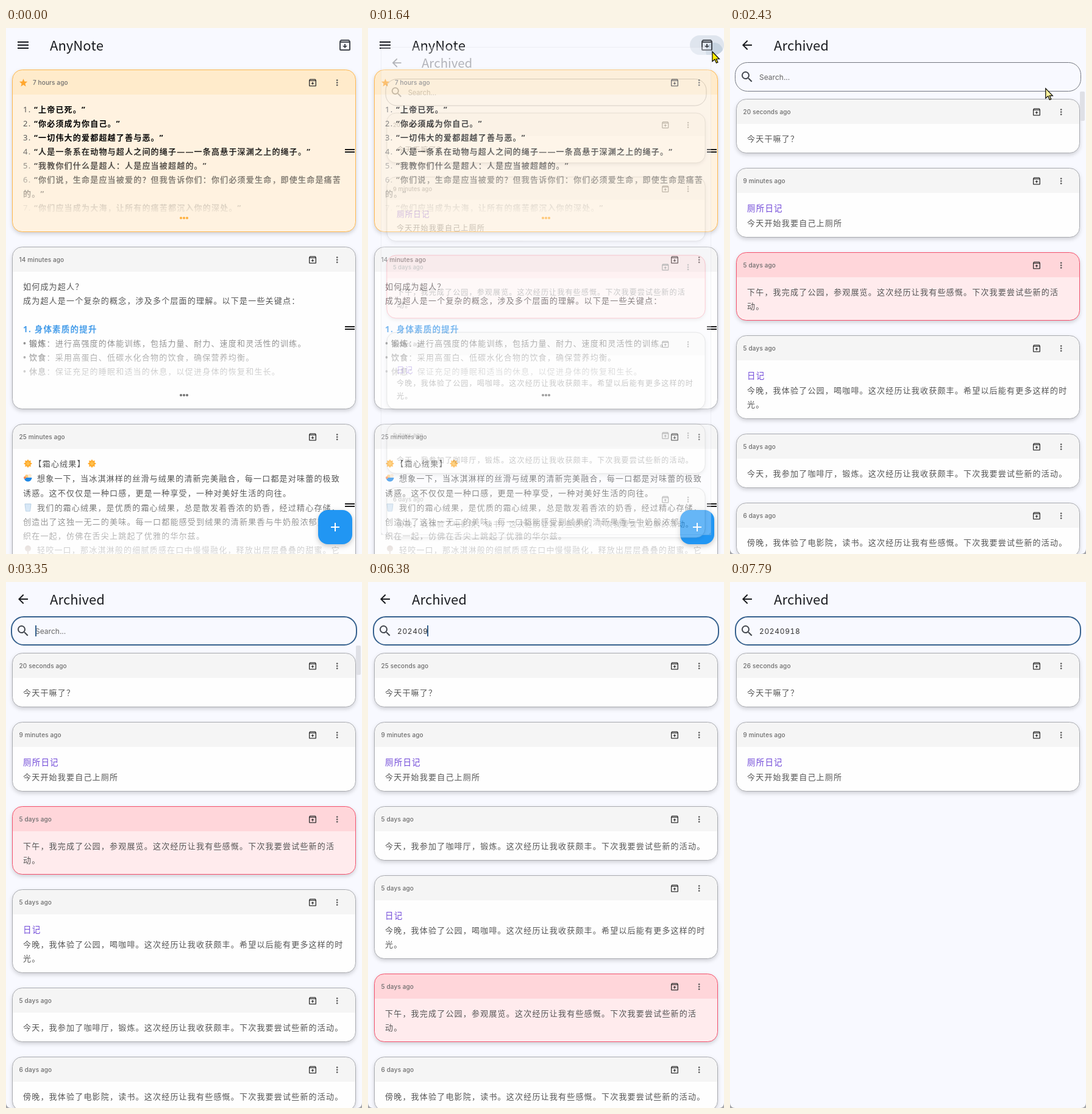
Animation, 584 px wide and 861 px high, one loop 8000 ms. Source, as an HTML page:

```html
<!DOCTYPE html>
<html lang="zh-CN">
<head>
<meta charset="utf-8">
<title>Notes</title>
<style>
html,body{margin:0;width:100%;height:100%;overflow:hidden;background:#f8f9ff}
svg{display:block;position:absolute;left:0;top:0}
text{font-family:"Noto Sans CJK SC",sans-serif;white-space:pre;text-spacing-trim:space-all;font-kerning:none}
.title{font-size:22px;fill:#1a1c20}
.time,.hint,.query{font-family:Inter,sans-serif}
.time{font-size:10px;font-weight:500;letter-spacing:.12px;fill:#6c6c6c}
.body{font-family:"Noto Sans","Noto Sans CJK SC",sans-serif;font-size:13px;letter-spacing:1.2px;fill:#555}
.bold{font-weight:700}
.dark{fill:#000}
.head{font-size:13.5px;fill:#7048d8}
.blue{font-size:13.5px;font-weight:700;fill:#1e88e5}
.hint{font-size:12px;fill:#666}
.query{font-size:12px;font-variant-numeric:tabular-nums;letter-spacing:.65px;fill:#333}
.card{filter:drop-shadow(0 3px 3px rgba(0,0,0,.16))}
.fab{filter:drop-shadow(0 3px 4px rgba(0,0,0,.22))}
</style>
</head>
<body>
<svg id="stage" width="584" height="861" viewBox="0 0 584 861"></svg>
<script>
const ICON = {
  menu: 'M3 18h18v-2H3zM3 13h18v-2H3zM3 6v2h18V6z',
  back: 'M20 11H7.83l5.59-5.59L12 4l-8 8 8 8 1.41-1.41L7.83 13H20z',
  search: 'M15.5 14h-.79l-.28-.27A6.47 6.47 0 0 0 16 9.5 6.5 6.5 0 1 0 9.5 16c1.61 0 3.09-.59 4.23-1.57l.27.28v.79l5 4.99L20.49 19zm-6 0C7.01 14 5 11.99 5 9.5S7.01 5 9.5 5 14 7.01 14 9.5 11.99 14 9.5 14z',
  box: 'M20.54 5.23l-1.39-1.68C18.88 3.21 18.47 3 18 3H6c-.47 0-.88.21-1.16.55L3.46 5.23C3.17 5.57 3 6.02 3 6.5V19c0 1.1.9 2 2 2h14c1.1 0 2-.9 2-2V6.5c0-.48-.17-.93-.46-1.27zM6.24 5h11.52l.83 1H5.42zM5 19V8h14v11z',
  down: 'M13 10h-2v3H8l4 4 4-4h-3z',
  up: 'M8 14h3v3h2v-3h3l-4-4z'
};
const THEME = {
  plain: {line: '#a9abb0', top: '#f5f5f5', fill: '#fefefe', dots: '#757575'},
  gold: {line: '#ffb74d', top: '#ffebcb', fill: '#fff2e0', dots: '#ffb140'},
  rose: {line: '#f4506c', top: '#ffd6da', fill: '#ffebed', dots: '#757575'}
};

const text = (x, y, cls, s) => `<text x="${x}" y="${y}" class="${cls}">${s}</text>`;
const body = (x, mid, s, cls = '') => text(x, mid + 5, 'body ' + cls, s);
const rect = (x, y, w, h, r, fill, more = '') =>
  `<rect x="${x}" y="${y}" width="${w}" height="${h}" rx="${r}" fill="${fill}" ${more}/>`;
const dot = (x, y, r, fill) => `<circle cx="${x}" cy="${y}" r="${r}" fill="${fill}"/>`;
const icon = (d, x, y, size, fill) =>
  `<path transform="translate(${x} ${y}) scale(${size / 24})" fill="${fill}" d="${d}"/>`;

function star(x, y, tips, outer, inner, fill) {
  const pts = Array.from({length: tips * 2}, (_, i) => {
    const a = i * Math.PI / tips - Math.PI / 2, r = i % 2 ? inner : outer;
    return (x + r * Math.cos(a)).toFixed(1) + ',' + (y + r * Math.sin(a)).toFixed(1);
  });
  return `<polygon points="${pts.join(' ')}" fill="${fill}"/>`;
}

function card({y, h, time, theme = 'plain', arrow = 'up', starred, inner = ''}) {
  const c = THEME[theme], mid = y + 21.5;
  return `<g class="card">${rect(10.5, y + .5, 563, h, 16, c.fill)}
    <path fill="${c.top}" d="M10.5 ${y + 41}v-24.5a16 16 0 0 1 16-16h531a16 16 0 0 1 16 16v24.5z"/>
    ${rect(10.5, y + .5, 563, h, 16, 'none', `stroke="${c.line}"`)}</g>
    ${starred ? star(28.5, y + 22, 5, 7, 3.1, '#ffa72f') : ''}
    ${text(starred ? 44 : 21.5, y + 25, 'time', time)}
    ${icon(ICON.box + ICON[arrow], 495, mid - 8, 16, '#333')}
    ${[-4, 0, 4].map(d => dot(543.2, mid + d, 1.35, '#555')).join('')}${inner}`;
}

// tall card whose text fades out towards the bottom
function tallCard(o) {
  const c = THEME[o.theme || 'plain'], id = 'fade' + o.y;
  const fade = `<linearGradient id="${id}" gradientUnits="userSpaceOnUse" x1="0" x2="0" y1="${o.y + 112}" y2="${o.y + 240}">
    <stop stop-color="${c.fill}" stop-opacity="0"/><stop offset="1" stop-color="${c.fill}"/></linearGradient>
    ${rect(12, o.y + 112, 560, 135, 0, `url(#${id})`)}`;
  const more = [287, 292, 297].map(x => dot(x, o.y + 243, 2.1, c.dots)).join('');
  const grip = rect(556, o.y + 130, 16, 2, 0, '#1a1a1a') + rect(556, o.y + 134, 16, 2, 0, '#1a1a1a');
  return card({...o, h: 265, arrow: 'down', inner: o.inner + fade + more + grip});
}

const quotes = [
  '“上帝已死。”', '“你必须成为你自己。”', '“一切伟大的爱都超越了善与恶。”',
  '“人是一条系在动物与超人之间的绳子——一条高悬于深渊之上的绳子。”',
  '“我教你们什么是超人：人是应当被超越的。”',
  '“你们说，生命是应当被爱的？但我告诉你们：你们必须爱生命，即使生命是痛苦',
  '“你们应当成为大海，让所有的痛苦都沉入你的深处。”'
];
const goldText = quotes.map((q, i) => {
  const y = 133 + 23 * (i + (i > 5));
  return body(28, y, i + 1 + '.') + body(46, y, q, 'bold dark');
}).join('') + body(28, 271, '的。”', 'bold dark');

const tips = [
  ['锻炼', '进行高强度的体能训练，包括力量、耐力、速度和灵活性的训练。'],
  ['饮食', '采用高蛋白、低碳水化合物的饮食，确保营养均衡。'],
  ['休息', '保证充足的睡眠和适当的休息，以促进身体的恢复和生长。']
];
const tipText = body(28, 423, '如何成为超人？')
  + body(28, 446, '成为超人是一个复杂的概念，涉及多个层面的理解。以下是一些关键点：')
  + body(28, 493, '1. 身体素质的提升', 'blue')
  + tips.map(([k, v], i) => {
    const y = 516 + 23 * i;
    return body(28, y, '•', 'bold') + body(38, y, k, 'bold') + body(66.4, y, '：') + body(80.8, y, v);
  }).join('');

const spark = x => star(x, 713, 8, 7, 4.6, '#ffa726') + star(x, 713, 5, 4.5, 2.2, '#ffc04d');
const bowl = dot(34, 734, 3, '#ffcc80') + dot(39, 733, 3, '#ffe9d2')
  + '<path fill="#1e88e5" d="M29.5 736h13a6.5 6.5 0 0 1-13 0z"/>' + dot(31, 736, 2, '#ff8a50');
const cup = '<path fill="#cfe3f5" stroke="#a9c6de" d="M31 779h10l-1.5 12h-7z"/>';
const fruitText = spark(36) + body(45.5, 713, '【霜心绒果】') + spark(141) + bowl
  + body(51, 737, '想象一下，当冰淇淋样的丝滑与绒果的清新完美融合，每一口都是对味蕾的极致')
  + body(28, 761, '诱惑。这不仅仅是一种口感，更是一种享受，一种对美好生活的向往。') + cup
  + body(51, 785, '我们的霜心绒果，是优质的霜心绒果，总是散发着香浓的奶香，经过精心存储，')
  + body(28, 808, '创造出了这独一无二的美味。每一口都能感受到绒果的清新果香与牛奶般浓郁交')
  + body(28, 831, '织在一起，仿佛在舌尖上跳起了优雅的华尔兹。')
  + dot(36, 852, 5, '#b9a59c') + rect(35, 856, 2, 5, 0, '#b9a59c')
  + body(51, 854, '轻咬一口，那冰淇淋般的细腻质感在口中慢慢融化，释放出层层叠叠的甜蜜。它');

const home = rect(0, 0, 584, 861, 0, '#f8f9ff')
  + icon(ICON.menu, 16, 16, 24, '#1a1c20') + text(72, 37, 'title', 'AnyNote')
  + `<g id="press">${rect(528, 12, 56, 32, 16, '#dfe5ee')}<circle id="ripple" cx="568" cy="38" fill="#c6d3e0" clip-path="url(#pill)"/></g>`
  + icon(ICON.box + ICON.down, 544, 16, 24, '#43474e')
  + tallCard({y: 68, theme: 'gold', starred: true, time: '7 hours ago', inner: goldText})
  + tallCard({y: 358, time: '14 minutes ago', inner: tipText})
  + tallCard({y: 648, time: '25 minutes ago', inner: fruitText})
  + `<g class="fab">${rect(512, 789, 56, 56, 16, '#2196f3')}</g>`
  + '<path d="M533 817h14M540 810v14" stroke="#fff" stroke-width="2"/>';

const NOTES = {
  today: {h: 88, lines: ['今天干嘛了？']},
  log: {h: 113, time: '9 minutes ago', head: '厕所日记', lines: ['今天开始我要自己上厕所']},
  park: {h: 111, time: '5 days ago', theme: 'rose', lines: ['下午，我完成了公园，参观展览。这次经历让我有些感慨。下次我要尝试些新的活', '动。']},
  diary: {h: 136, time: '5 days ago', head: '日记', lines: ['今晚，我体验了公园，喝咖啡。这次经历让我收获颇丰。希望以后能有更多这样的时', '光。']},
  cafe: {h: 88, time: '5 days ago', lines: ['今天，我参加了咖啡厅，锻炼。这次经历让我收获颇丰。下次我要尝试些新的活动。']},
  movie: {h: 88, time: '6 days ago', lines: ['傍晚，我体验了电影院，读书。这次经历让我有些感慨。下次我要尝试些新的活动。']}
};

function noteList(names, secs) {
  let y = 116;
  return ['today', 'log', ...names].map(name => {
    const n = NOTES[name], first = y + (n.head ? 90 : 65);
    const inner = (n.head ? body(28, y + 66, n.head, 'head') : '')
      + n.lines.map((s, i) => body(28, first + 23 * i, s)).join('');
    const out = card({...n, y, time: n.time || secs + ' seconds ago', inner});
    y += n.h + 25;
    return out;
  }).join('');
}

const archive = rect(0, 0, 584, 861, 0, '#f8f9ff')
  + icon(ICON.back, 16, 16, 24, '#1a1c20') + text(72, 37, 'title', 'Archived')
  + '<g id="list"></g>' + rect(8.5, 56.5, 567, 47, 20, '#f8f9ff', 'id="field"')
  + icon(ICON.search, 16, 68, 24, '#43474e')
  + text(48, 85, 'hint', '') + rect(0, 71, 2, 18, 0, '#36618e', 'id="caret"')
  + rect(574, 104, 8, 48, 2, '#dfe0e6', 'id="bar"')
  + '<path fill="#a5a6ab" d="M0 853v8h8a8 8 0 0 1-8-8zM584 853v8h-8a8 8 0 0 0 8-8z"/>'
  + rect(.5, .5, 583, 860, 0, 'none', 'id="edge" stroke="#d6d7dd"');

stage.innerHTML = `<clipPath id="pill">${rect(528, 12, 56, 32, 16, '#000')}</clipPath>
  <g id="home">${home}</g><g id="archive">${archive}</g>
  <path id="pointer" stroke="#000" stroke-width="1.2" d="M0 0V16L4 12.5L6.5 18.5L9 17.5L6.5 12H11.5Z"/>`;

const $ = id => document.getElementById(id);
const [page, list, field, caret, bar, edge, press, ripple, pointer] =
  ['archive', 'list', 'field', 'caret', 'bar', 'edge', 'press', 'ripple', 'pointer'].map($);
const query = page.querySelector('.hint');

const WORD = '20240918';
const KEYS = [4620, 4930, 5270, 5580, 6040, 6380, 7070, 7320];
const SECS = [[0, 20], [4620, 23], [5270, 24], [6380, 25], [7320, 26]];
const ORDER = [
  [0, ['park', 'diary', 'cafe', 'movie']],
  [5580, ['cafe', 'movie', 'diary', 'park']],
  [6380, ['cafe', 'diary', 'park', 'movie']],
  [7070, ['park', 'diary', 'cafe', 'movie']],
  [7320, []]
];
const CARET = [[2600, 2850], [3350, 3870], [4340, 6850], [7070, 7790]];
const PATH = [[930, 574, 820], [990, 572, 420], [1050, 568, 38], [1600, 568, 38], [1760, 556, 41],
  [2150, 540, 110], [2370, 540, 110], [2480, 500, 90]];

const clamp = v => Math.max(0, Math.min(1, v));
const latest = (steps, t) => steps.filter(s => s[0] <= t).pop()[1];
const show = (el, on) => el.setAttribute('visibility', on ? 'visible' : 'hidden');
let lastKey = '';

function movePointer(t) {
  const on = t >= 930 && t < 2480;
  show(pointer, on);
  if (!on) return;
  const i = PATH.findIndex(p => p[0] > t), [t0, x0, y0] = PATH[i - 1], [t1, x1, y1] = PATH[i];
  const k = (t - t0) / (t1 - t0);
  pointer.setAttribute('transform', `translate(${x0 + (x1 - x0) * k} ${y0 + (y1 - y0) * k})`);
  pointer.setAttribute('fill', t < 1700 ? '#ffee00' : '#fff59d');
}

// the outline thickens inwards on focus
function outline(focus) {
  const w = 1 + focus, box = {x: 8 + w / 2, y: 56 + w / 2, width: 568 - w, height: 48 - w,
    stroke: focus ? '#36618e' : '#73777f', 'stroke-width': w};
  for (const k in box) field.setAttribute(k, box[k]);
}

function draw(t) {
  press.setAttribute('opacity', t < 1050 ? 0 : t < 1460 ? .3 : .3 + .7 * clamp((t - 1460) / 100));
  ripple.setAttribute('r', 14 * clamp((t - 1480) / 110));

  const enter = clamp((t - 1620) / 135), scale = 1 - .12 * (1 - enter) ** 3;
  show(page, enter > 0);
  page.setAttribute('opacity', clamp(enter * 2));
  page.setAttribute('transform', `translate(292 430.5) scale(${scale}) translate(-292 -430.5)`);
  edge.setAttribute('opacity', t < 2150 ? 1 : 0);

  const secs = latest(SECS, t), order = latest(ORDER, t), key = secs + order.join();
  if (key !== lastKey) list.innerHTML = noteList(order, secs);
  lastKey = key;

  outline(clamp((t - 2560) / 160));
  bar.setAttribute('opacity', t >= 2000 && t < 3530 ? 1 : 0);

  const n = KEYS.filter(k => k <= t).length;
  query.textContent = n ? WORD.slice(0, n) : 'Search...';
  query.setAttribute('class', n ? 'query' : 'hint');
  caret.setAttribute('x', Math.round(48 + 8.15 * n));
  caret.setAttribute('opacity', CARET.some(([a, b]) => t >= a && t < b) ? 1 : 0);
  movePointer(t);
}

const start = performance.now();
function tick() {
  draw((performance.now() - start) % 8000);
  requestAnimationFrame(tick);
}
tick();
</script>
</body>
</html>
```
